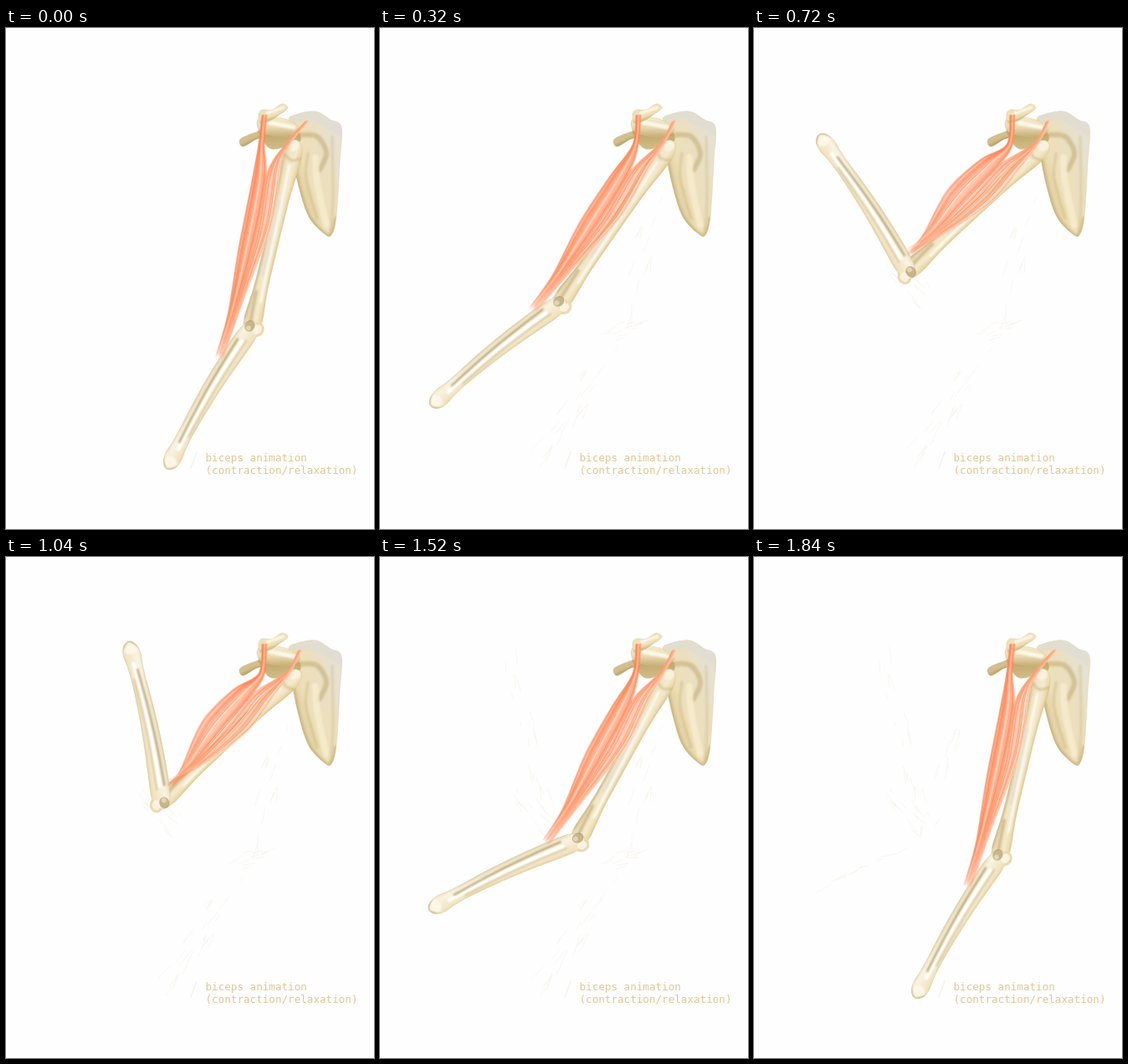
An HTML page with a canvas for the animation above (1920 ms loop, 440x600 px).

```html
<!DOCTYPE html>
<html lang="en">
<head>
<meta charset="utf-8">
<title>Biceps animation</title>
<style>
html, body { margin: 0; width: 100%; height: 100%; overflow: hidden; background: #fefefe; }
canvas { position: absolute; left: 0; top: 0; }
p {
  position: absolute; left: 238.5px; top: 507px; margin: 0; white-space: pre;
  font: 12.6px/15px "DejaVu Sans Mono", monospace; color: #e2c592;
}
</style>
</head>
<body>
<canvas width="440" height="600"></canvas>
<p>biceps animation
(contraction/relaxation)</p>
<script>
const ctx = document.querySelector('canvas').getContext('2d');
const STEP = 80, COUNT = 24;
const SHOULDER = [345, 143], NECK = [304, 142];

// key poses: step, elbow x, elbow y, forearm angle clockwise from straight down
const POSES = [
  [0, 293, 360, 31], [4, 214, 331, 51.6], [9, 184, 292, 147.2], [13, 186, 293, 168.5],
  [17, 212, 313, 115.2], [19, 236, 340, 65.1], [23, 293, 360, 31]
];

const lerp = (a, b, t) => a + (b - a) * t;
const mix = (p, q, t) => p.map((v, i) => lerp(v, q[i], t));
const clamp = v => Math.max(0, Math.min(1, v));
const bump = (x, size) => Math.exp(-((x / size) ** 2));
const noise = n => { const v = Math.sin(n * 12.9898) * 43758.5453; return v - Math.floor(v); };

// cubic through the key poses, slopes taken from the neighbours
function poseAt(step) {
  const i = Math.max(1, POSES.findIndex(p => p[0] >= step));
  const a = POSES[i - 1], b = POSES[i], before = POSES[i - 2] || a, after = POSES[i + 1] || b;
  const span = b[0] - a[0], t = (step - a[0]) / span, s = 1 - t;
  return [1, 2, 3].map(k => {
    const m = (b[k] - before[k]) / (b[0] - before[0]) * span;
    const n = (after[k] - a[k]) / (after[0] - a[0]) * span;
    return lerp(a[k], b[k], t * t * (3 - 2 * t)) + m * t * s * s - n * t * t * s;
  });
}

// smooth curve through all points
function curve(pts, closed) {
  const path = new Path2D(), n = pts.length;
  const at = i => closed ? pts[(i + n) % n] : pts[Math.max(0, Math.min(n - 1, i))];
  path.moveTo(...pts[0]);
  for (let i = 0; i < (closed ? n : n - 1); i++) {
    const [a, b, c, d] = [at(i - 1), at(i), at(i + 1), at(i + 2)];
    path.bezierCurveTo(b[0] + (c[0] - a[0]) / 6, b[1] + (c[1] - a[1]) / 6,
      c[0] - (d[0] - b[0]) / 6, c[1] - (d[1] - b[1]) / 6, c[0], c[1]);
  }
  return path;
}

function gradient(x0, y0, x1, y1, ...colors) {
  const g = ctx.createLinearGradient(x0, y0, x1, y1);
  colors.forEach((c, i) => g.addColorStop(i / (colors.length - 1), c));
  return g;
}

function brush(color, width, ...pts) {
  ctx.strokeStyle = color;
  ctx.lineWidth = width;
  ctx.stroke(curve(pts));
}

function blob(x, y, rx, ry, color) {
  ctx.fillStyle = color;
  ctx.beginPath();
  ctx.ellipse(x, y, rx, ry, 0, 0, 7);
  ctx.fill();
}

// filled outline with soft brush marks kept inside it
function bone(outline, fill, paint) {
  const path = curve(outline, true);
  ctx.save();
  ctx.fillStyle = fill;
  ctx.fill(path);
  ctx.strokeStyle = 'rgba(215,193,142,.5)';
  ctx.lineWidth = .8;
  ctx.stroke(path);
  ctx.clip(path);
  ctx.filter = 'blur(1px)';
  if (paint) paint();
  ctx.restore();
}

// long bone along x; half(x) is its half width, bow how far the middle is pushed to +y
function longBone(len, half, bow, fill, paint) {
  const edge = (x, v) => [x, bow * Math.sin(Math.PI * clamp(x / len)) + v * half(x)];
  const outline = [], N = 16;
  for (let i = 0; i < 2 * N; i++) {
    const t = -Math.cos(Math.PI * i / N), cap = Math.sqrt(1 - t ** 10);
    outline.push(edge(len * (t + 1) / 2 + 9 * t, i < N ? cap : -cap));
  }
  const streak = (color, width, v0, v1, from = .05, to = .95) => brush(color, width,
    ...[0, .25, .5, .75, 1].map(t => edge(len * lerp(from, to, t), lerp(v0, v1, t))));
  bone(outline, fill, () => paint(streak));
}

function scapula() {
  bone([[346, 104], [370, 100], [388, 110], [401, 119], [399, 160], [395, 225], [389, 248],
    [380, 246], [362, 226], [350, 190], [342, 150], [338, 112]],
    gradient(340, 180, 402, 160, '#dac694', '#eddfb8', '#eadfc0', '#e6e1d2'), () => {
      brush('rgba(224,221,210,.9)', 13, [345, 106], [368, 104], [402, 124]);
      brush('rgba(190,165,106,.55)', 5, [342, 148], [350, 190], [362, 226], [386, 249], [395, 228]);
      brush('rgba(190,165,106,.5)', 6, [352, 128], [372, 130], [383, 150], [375, 170]);
      brush('rgba(198,174,118,.4)', 3, [361, 150], [359, 180], [372, 228]);
      brush('rgba(248,237,208,.8)', 8, [370, 155], [372, 185], [383, 236]);
      brush('rgba(206,184,132,.4)', 3, [390, 130], [391, 205], [388, 247]);
    });
  bone([[279, 136], [285, 130], [312, 121], [318, 128], [300, 133], [284, 142]], '#d3bf8d', () => {
    brush('rgba(170,145,88,.6)', 3, [281, 142], [300, 133], [317, 128]);
  });
  bone([[304, 121], [345, 122], [352, 135], [334, 142], [318, 145], [308, 136]],
    gradient(0, 122, 0, 145, '#bda366', '#d2bd88'));
  bone([[303, 108], [334, 109], [352, 122], [336, 130], [305, 125]],
    gradient(0, 106, 0, 132, '#f6ecd0', '#ead9b0', '#bfa76c'), () => {
      brush('rgba(255,251,238,.9)', 5, [314, 113], [344, 119]);
    });
  bone([[302, 104], [306, 98], [318, 98], [330, 91], [337, 96], [325, 105], [316, 111], [304, 114]],
    '#eee0ba', () => {
      brush('rgba(182,157,100,.55)', 3, [304, 113], [318, 109], [338, 100]);
      brush('#fff9e9', 3, [312, 102], [332, 95]);
    });
}

function humerus(elbow) {
  const dx = elbow[0] - SHOULDER[0], dy = elbow[1] - SHOULDER[1], len = Math.hypot(dx, dy);
  ctx.save();
  ctx.translate(...SHOULDER);
  ctx.rotate(Math.atan2(dy, dx));
  const half = x => 8 + 4.5 * bump(x, 40) + 4.5 * bump(len - x, 32);
  longBone(len, half, 0, gradient(0, -11, 0, 12, '#e8d4a3', '#f4e9ca', '#f0e5c8', '#ddcb9b'),
    streak => {
      streak('rgba(192,168,110,.55)', 3, .95, .9);
      streak('rgba(224,222,212,.9)', 4, .2, .1, .3, .7);
      streak('rgba(255,252,242,.9)', 3, .1, -.4, .1, .85);
      streak('rgba(212,184,122,.5)', 3, -1, -1);
      streak('rgba(186,160,100,.55)', 4, .5, .2, .8, .97);
      brush('rgba(192,168,110,.45)', 3, [10, 11], [16, 0], [11, -11]);
      blob(-2, 1, 7, 6, 'rgba(252,246,228,.75)');
    });
  ctx.restore();
}

function forearm(elbow, turn) {
  const len = 187;
  ctx.save();
  ctx.translate(...elbow);
  ctx.rotate(turn);
  blob(-3, -7, 9, 8, '#eadab0');
  const half = x => lerp(12.5, 7.5, x / len) + 4.5 * bump(len - x, 18);
  longBone(len, half, 4, gradient(0, -11, 0, 15, '#efdfb6', '#f4e9cd', '#f9f3e2', '#e9dcb8'),
    streak => {
      streak('rgba(216,194,142,.5)', 3, -1, -1);
      streak('rgba(255,255,252,.95)', 5, 0, -.1, .1, .9);
      streak('rgba(160,138,80,.8)', 2.2, .5, .2, .1, .86);
      streak('rgba(178,156,100,.6)', 1.4, -.3, -.6, .08, .8);
      streak('rgba(204,183,132,.5)', 2, 1, 1);
      blob(len, 0, 7, 8, 'rgba(253,248,234,.85)');
      brush('rgba(178,150,88,.65)', 3, [len - 2, 13], [len + 10, 0], [len - 2, -13]);
    });
  blob(-3, -7, 6, 5, 'rgba(253,248,234,.8)');
  blob(-2, 3, 7, 6, 'rgba(166,143,86,.6)');
  blob(1, 3, 3, 3, 'rgba(238,226,194,.7)');
  ctx.restore();
}

// fibres run from two heads, swell across the chord and meet on the forearm;
// the shorter the chord, the more the front bulges
function muscle(elbow, turn) {
  const c = Math.cos(turn), s = Math.sin(turn);
  const onForearm = (x, y) => [elbow[0] + x * c - y * s, elbow[1] + x * s + y * c];
  const reach = clamp((elbow[0] - 190) / 90), stretch = clamp((elbow[0] - 250) / 43);
  const tip = onForearm(16 + 28 * reach, 15);
  const dx = tip[0] - NECK[0], dy = tip[1] - NECK[1], len = Math.hypot(dx, dy);
  const inChord = (t, off) => [NECK[0] + dx * t - dy / len * off, NECK[1] + dy * t + dx / len * off];
  const bulge = 3 + .21 * Math.max(0, 250 - len);
  const front = [inChord(.2, .75 * bulge), inChord(.5, bulge), inChord(.8, .35 * bulge)];
  const back = [inChord(.06, -28), inChord(.35, -30), inChord(.73, -14)];
  const tones = ['255,116,62', '255,138,90', '255,160,118', '255,126,74', '255,212,188'];
  const N = 36;
  ctx.globalAlpha = .6;
  for (let j = 0; j < N; j++) {
    const k = (j * 13 % N) / (N - 1), r = noise(j + 3), tone = tones[Math.floor(r * 5)];
    const end = onForearm(14 + 28 * reach + r * 10, lerp(20, 10, k));
    const head = k < .5
      ? [[306 + k * 11, 105], [302 + k * 13, 140]]
      : [[345 + 8 * stretch + k * 8, 116 - k * 5], [330 + k * 10, 138]];
    const alphas = [.6, 1, 1, .85, .15].map(a => `rgba(${tone},${a})`);
    brush(gradient(...head[0], ...end, ...alphas), 1.2 + 1.8 * noise(j + 60),
      ...head, ...front.map((p, i) => mix(p, back[i], k)), end);
  }
  ctx.globalAlpha = 1;
}

// faint leftover pencil marks scattered along a segment
function marks(a, b, count, spread) {
  const dir = Math.atan2(b[1] - a[1], b[0] - a[0]);
  for (let i = 0; i < count; i++) {
    const n = a[0] + i * 4;
    const [x, y] = mix(a, b, noise(n));
    const off = (noise(n + 1) - .5) * spread, len = 5 + noise(n + 2) * 17;
    const way = dir + (noise(n + 3) - .5) * .5;
    const px = x - Math.sin(dir) * off, py = y + Math.cos(dir) * off;
    brush('rgba(222,205,165,.2)', .8, [px, py],
      [px + Math.cos(way) * len, py + Math.sin(way) * len]);
  }
}

function leftovers(step) {
  brush('rgba(220,200,155,.4)', .8, [228, 508], [221, 527]);
  if (step > 0 && step < 22) {
    marks([334, 195], [296, 350], 14, 24);
    marks([265, 372], [310, 355], 12, 20);
    marks([282, 375], [195, 515], 26, 30);
  }
  if (step > 7) marks([155, 265], [205, 325], 15, 28);
  if (step > 13) marks([152, 110], [192, 280], 18, 24);
  if (step > 19) {
    marks([255, 165], [208, 330], 14, 24);
    marks([212, 335], [90, 390], 9, 8);
  }
}

function draw(now) {
  const step = Math.floor(now / STEP) % COUNT;
  const [x, y, angle] = poseAt(step);
  const elbow = [x, y], turn = (90 + angle) * Math.PI / 180;
  ctx.clearRect(0, 0, 440, 600);
  ctx.lineCap = ctx.lineJoin = 'round';
  leftovers(step);
  scapula();
  humerus(elbow);
  forearm(elbow, turn);
  muscle(elbow, turn);
}

const start = performance.now();
function tick() {
  draw(performance.now() - start);
  requestAnimationFrame(tick);
}
tick();
</script>
</body>
</html>
```
